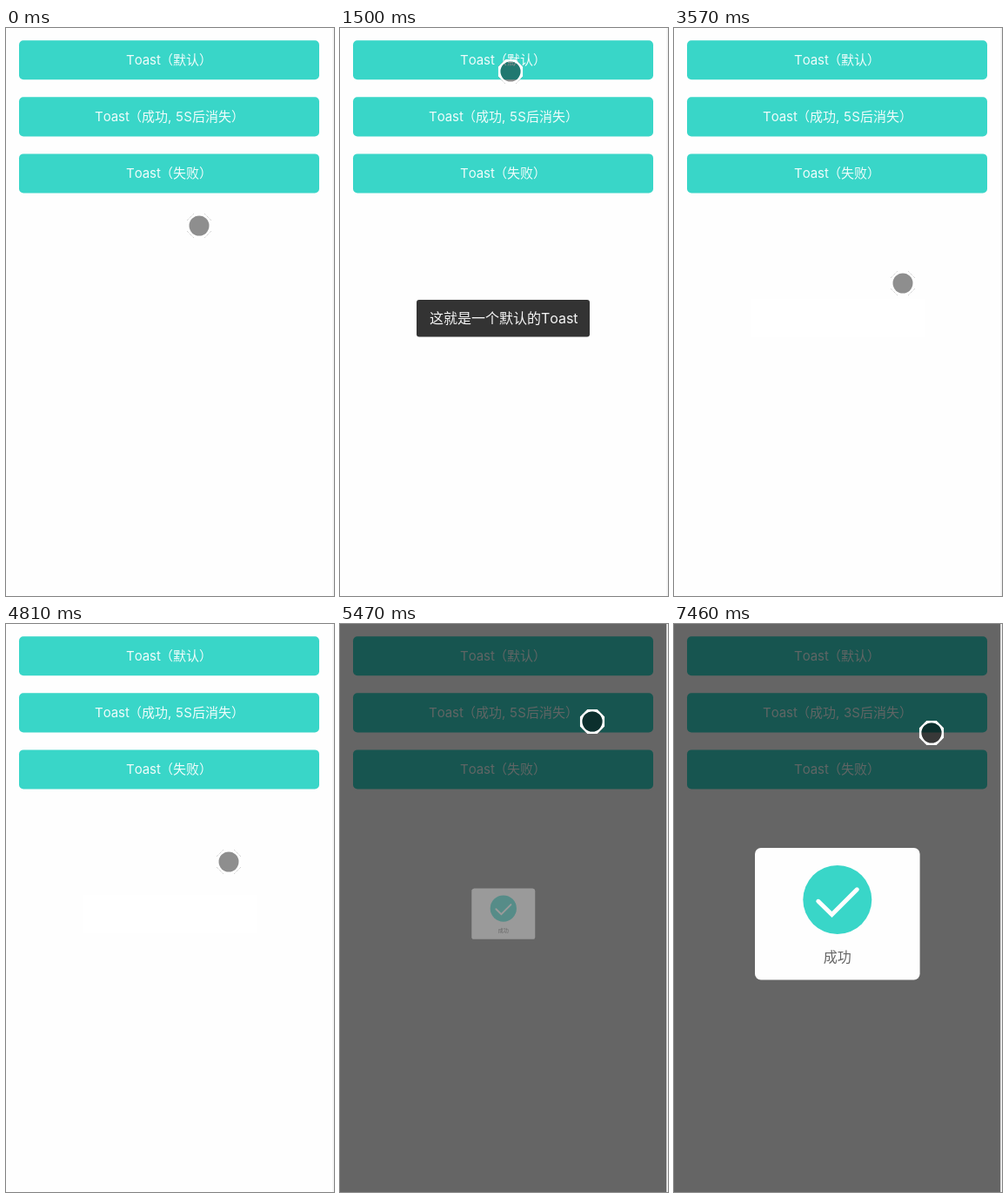
An HTML page with a canvas that plays this animation: 377 px wide and 652 px high, repeating every 8000 ms.

```html
<!DOCTYPE html>
<html lang="zh-CN">
<head>
<meta charset="utf-8">
<title>Toast</title>
<style>
  html, body { margin: 0; width: 100%; height: 100%; overflow: hidden; background: #fefefe; }
  canvas { display: block; }
</style>
</head>
<body>
<canvas id="stage" width="377" height="652"></canvas>
<script>
const ctx = document.getElementById('stage').getContext('2d');
const LOOP = 8000, TICK = 134;
const TEAL = '#39d6c8', PAPER = '#fefefe';
const FONT = 'Inter, "Noto Sans CJK SC", "Noto Sans CJK", sans-serif';
const TOAST_IN = 1500, TOAST_OUT = 3570, MODAL_IN = 5470, MODAL_FULL = 5630;

const HOME = { x: 222, y: 227 };
const MOVES = [
  { from: 425, to: 1070, x: 195, y: 34, bend: -16 },
  { from: 1400, to: 1890, x: 263, y: 293, bend: -50 },
  { from: 3900, to: 4000, x: 256, y: 273, bend: 0 },
  { from: 4700, to: 5200, x: 290, y: 112, bend: 0 },
  { from: 5650, to: 6020, x: 296, y: 125, bend: 0 }
];

function box(x, y, w, h, r, color) {
  ctx.fillStyle = color;
  ctx.beginPath();
  ctx.roundRect(x, y, w, h, r);
  ctx.fill();
}

function disc(x, y, r, color) {
  ctx.fillStyle = color;
  ctx.beginPath();
  ctx.arc(x, y, r, 0, Math.PI * 2);
  ctx.fill();
}

function text(str, x, y, size, color) {
  ctx.font = `400 ${size}px ${FONT}`;
  ctx.fontKerning = 'none';
  ctx.fillStyle = color;
  ctx.fillText(str, x, y);
}

function drawPage(t) {
  ctx.fillStyle = PAPER;
  ctx.fillRect(0, 0, 377, 652);

  const left = t < 6490 ? 5 : t < 7460 ? 4 : 3;
  const ink = 'rgba(255,255,255,.92)';
  ['（默认）', '（成功,', '（失败）'].forEach((label, i) => {
    const x = i === 1 ? 102 : 138;
    const base = 42 + 65 * i;
    box(15, 14.2 + 65.1 * i, 345, 45.1, 5, TEAL);
    text('Toast', x, base, 15, ink);
    text(label, x + 39, base, 15, ink);
  });
  text(left, 195, 107, 15, ink);
  text('S后消失）', 204.3, 107, 15, ink);
}

function drawToast(t) {
  if (t >= MODAL_IN) return;
  if (t >= TOAST_OUT) box(88, 311, 200, 44, 0, '#fff');
  else if (t >= TOAST_IN) {
    box(88, 312, 199, 42.5, 3, '#333');
    text('这就是一个默认的', 103, 338.7, 16, '#f6f6f6');
    text('Toast', 231, 338.7, 16, '#f6f6f6');
  }
}

function drawModal(t) {
  if (t < MODAL_IN) return;
  ctx.fillStyle = 'rgba(0,0,0,.6)';
  ctx.fillRect(0, 0, 375.5, 652);

  const opening = t < MODAL_FULL;
  const scale = opening ? 0.383 : 1;
  ctx.save();
  ctx.translate(187.8, 332.8);
  ctx.scale(scale, scale);
  box(-94.8, -75.8, 189.6, 151.6, 7, PAPER);
  disc(0, -16.3, 39.5, TEAL);
  ctx.strokeStyle = PAPER;
  ctx.lineWidth = 5;
  ctx.lineCap = 'round';
  ctx.beginPath();
  ctx.moveTo(-22, -14.5);
  ctx.lineTo(-6.3, 0.7);
  ctx.lineTo(22.5, -28);
  ctx.stroke();
  text('成功', -16, 55.5, 16, '#666');
  // The card fades in as one group over the dimmed page
  if (opening) box(-95.5, -76.5, 191, 153, 7, 'rgba(102,102,102,.65)');
  ctx.restore();
}

// Position moves in ticks, easing along slightly bent paths
function pointerAt(t) {
  const time = Math.floor((t + 5) / TICK) * TICK;
  let { x, y } = HOME;
  for (const m of MOVES) {
    const u = Math.min(1, Math.max(0, (time - m.from) / (m.to - m.from)));
    const s = u * u * (3 - 2 * u);
    x += (m.x - x) * s + m.bend * s * (1 - s);
    y += (m.y - y) * s;
  }
  return [Math.round(x), Math.round(y)];
}

function drawPointer(t) {
  const R = 14, C = 6, HOLE = 11.5;
  ctx.save();
  ctx.translate(...pointerAt(t));

  // White octagon with a round opening
  ctx.fillStyle = '#fff';
  ctx.beginPath();
  for (let i = 0; i < 8; i++) {
    const a = (i + 0.5) * Math.PI / 4;
    const r = Math.hypot(R, C);
    ctx.lineTo(r * Math.cos(a), r * Math.sin(a));
  }
  ctx.closePath();
  ctx.moveTo(HOLE, 0);
  ctx.arc(0, 0, HOLE, 0, Math.PI * 2);
  ctx.fill('evenodd');

  // Dotted corners
  ctx.strokeStyle = 'rgba(0,0,0,.4)';
  ctx.lineWidth = 0.6;
  ctx.setLineDash([1, 1]);
  ctx.beginPath();
  for (const sx of [-1, 1]) for (const sy of [-1, 1]) {
    ctx.moveTo(sx * R, sy * C);
    ctx.lineTo(sx * C, sy * R);
  }
  ctx.stroke();

  disc(0, 0, HOLE, 'rgba(0,0,0,.44)');
  ctx.restore();
}

const start = performance.now();
function frame() {
  const t = (performance.now() - start) % LOOP;
  drawPage(t);
  drawToast(t);
  drawModal(t);
  ctx.fillStyle = '#f0f0f0';
  ctx.fillRect(375.5, 0, 1.5, 652);
  drawPointer(t);
  requestAnimationFrame(frame);
}
frame();
</script>
</body>
</html>
```
